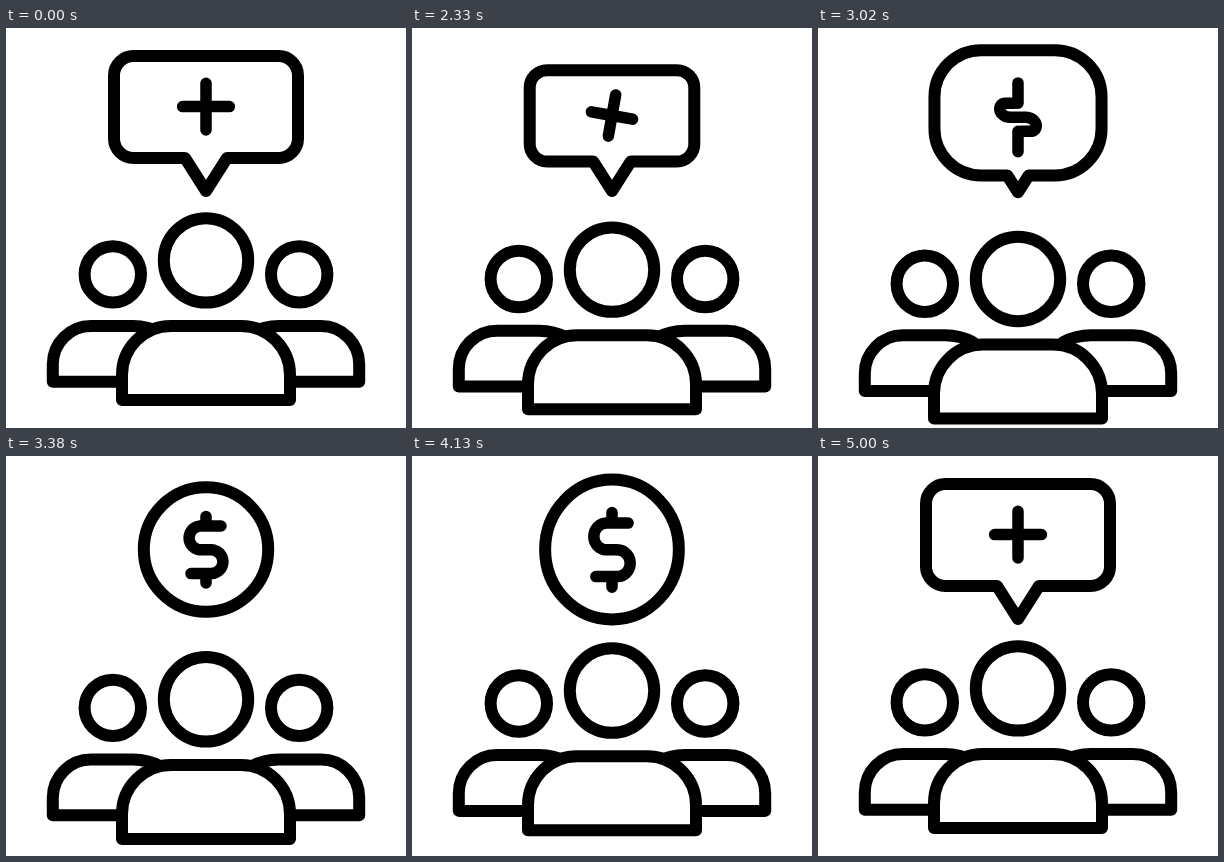
Animation, 400 px wide and 400 px high, one loop 5030 ms. Source, as an HTML page with a canvas:

```html
<!DOCTYPE html>
<html lang="en">
<head>
<meta charset="utf-8">
<title>Team and funding</title>
<style>
html, body { margin: 0; width: 100%; height: 100%; overflow: hidden; background: #fff; }
canvas { display: block; width: 400px; height: 400px; }
</style>
</head>
<body>
<canvas id="stage" width="400" height="400"></canvas>
<script>
const ctx = document.getElementById('stage').getContext('2d');
const LOOP = 5030, START = 2000, STEP = 30;
const TIP_Y = 163, COIN_Y = 93.5;
const FLIP_FROM = 3985, FLIP_TO = 4745;
const LINE = 12;

// Smooth curve through [time, value] keys without overshoot between them.
function track(...keys) {
  const n = keys.length;
  const d = keys.slice(1).map((k, i) => (k[1] - keys[i][1]) / (k[0] - keys[i][0]));
  const slope = keys.map((k, i) => {
    if (i === 0 || i === n - 1 || d[i - 1] * d[i] <= 0) return 0;
    return 2 * d[i - 1] * d[i] / (d[i - 1] + d[i]);
  });
  return t => {
    if (t <= keys[0][0]) return keys[0][1];
    if (t >= keys[n - 1][0]) return keys[n - 1][1];
    let i = 0;
    while (t > keys[i + 1][0]) i++;
    const [t0, a] = keys[i], [t1, b] = keys[i + 1];
    const h = t1 - t0, u = (t - t0) / h, u2 = u * u, u3 = u2 * u;
    return a * (2 * u3 - 3 * u2 + 1) + b * (3 * u2 - 2 * u3) +
      h * (slope[i] * (u3 - 2 * u2 + u) + slope[i + 1] * (u3 - u2));
  };
}

const dropAt = track([2000, 0], [2030, 0.1], [2300, 8], [2540, 19.6], [2640, 20.8],
  [2750, 20.4], [3080, 18], [3380, 10.9], [3620, 6.4], [3800, 4.3], [4160, 2],
  [4400, 0.9], [4730, 0.2], [5000, 0]);
const scaleAt = track([2000, 1], [2030, 0.978], [2250, 0.86], [2570, 1.08],
  [2750, 1.078], [3060, 1.1], [3380, 1], [3770, 1.168], [4160, 1.12], [4365, 1.07]);
const spinAt = track([2000, 0], [2030, 2.5], [2300, 90], [2600, 180]);
const morphAt = track([2500, 0], [2750, 0.13], [3060, 0.6], [3330, 1]);
const stretchAt = track([2450, 0], [2750, 0.4], [3250, 1]);

const mix = (a, b, u) => a + (b - a) * u;

function stroke(width = LINE) {
  ctx.setTransform(1, 0, 0, 1, 0, 0);
  ctx.lineWidth = width;
  ctx.stroke();
}

function ring(x, y, r) {
  ctx.beginPath();
  ctx.arc(x, y, r, 0, Math.PI * 2);
  stroke();
}

function sidePerson(dy, flip) {
  ctx.setTransform(flip ? -1 : 1, 0, 0, 1, flip ? 400 : 0, dy);
  ctx.beginPath();
  ctx.moveTo(116, 353.8);
  ctx.lineTo(46.8, 353.8);
  ctx.lineTo(46.8, 336);
  ctx.arcTo(46.8, 298, 85, 298, 38.2);
  ctx.lineTo(127, 298);
  ctx.quadraticCurveTo(142, 298, 155, 305);
  stroke();
  ring(flip ? 293.2 : 106.8, 246.4 + dy, 28.2);
}

function frontPerson(dy) {
  ctx.setTransform(1, 0, 0, 1, 0, dy);
  ctx.beginPath();
  ctx.moveTo(116, 372);
  ctx.lineTo(116, 347);
  ctx.arcTo(116, 298, 165, 298, 49);
  ctx.lineTo(235, 298);
  ctx.arcTo(284, 298, 284, 347, 49);
  ctx.lineTo(284, 372);
  ctx.closePath();
  ctx.fill();
  stroke();
  ring(200, 232.4 + dy, 42.2);
}

// Speech bubble at m = 0, coin at m = 1.
function badge(m) {
  const w = mix(92, 62.2, m), top = mix(28, 31.3, m), bottom = mix(130, 155.7, m);
  const r = mix(19.5, 62.2, m), base = mix(21, 0, m), tip = mix(TIP_Y, 155.7, m);
  const l = 200 - w, rt = 200 + w;
  ctx.beginPath();
  ctx.moveTo(200, tip);
  ctx.lineTo(200 - base, bottom);
  ctx.lineTo(l + r, bottom);
  ctx.arcTo(l, bottom, l, bottom - r, r);
  ctx.lineTo(l, top + r);
  ctx.arcTo(l, top, l + r, top, r);
  ctx.lineTo(rt - r, top);
  ctx.arcTo(rt, top, rt, top + r, r);
  ctx.lineTo(rt, bottom - r);
  ctx.arcTo(rt, bottom, rt - r, bottom, r);
  ctx.lineTo(200 + base, bottom);
  ctx.closePath();
  stroke();
}

// Point on the S of the dollar sign, centred on 0,0; u runs from 0 to 1.
function sPoint(u) {
  if (u > 0.5) return sPoint(1 - u).map(v => -v);
  const r = 11.9, bend = Math.PI * r;
  const d = u * 2 * (20 + bend + 5);
  if (d < 20) return [15 - d, -2 * r];
  if (d < 20 + bend) {
    const a = (d - 20) / r;
    return [-5 - r * Math.sin(a), -r - r * Math.cos(a)];
  }
  return [d - 25 - bend, 0];
}

// Plus at m = 0, dollar at m = 1; coordinates around its own centre.
function symbol(m, stretch) {
  const half = mix(23.4, 33.2, stretch), gap = 23.8 * m;
  ctx.beginPath();
  for (const side of [-1, 1]) {
    ctx.moveTo(0, side * half);
    ctx.lineTo(0, side * gap);
  }
  // The hooks of the S grow out of the ends of the bar.
  const n = 60;
  for (let i = 0; i <= n; i++) {
    const u = i / n, v = u * 2 - 1, [x, y] = sPoint(u);
    const bar = 23.4 * Math.sign(v) * Math.abs(v) ** 0.4;
    const px = mix(bar, x, m), py = y * m;
    if (i) ctx.lineTo(px, py); else ctx.moveTo(px, py);
  }
  stroke(11.5);
}

function draw(t) {
  ctx.setTransform(1, 0, 0, 1, 0, 0);
  ctx.fillStyle = '#fff';
  ctx.strokeStyle = '#000';
  ctx.lineCap = ctx.lineJoin = 'round';
  ctx.fillRect(0, 0, 400, 400);

  const drop = dropAt(t);
  sidePerson(drop / 2, false);
  sidePerson(drop / 2, true);
  frontPerson(drop);

  const p = Math.min(1, Math.max(0, (t - FLIP_FROM) / (FLIP_TO - FLIP_FROM)));
  const turn = p * p * (3 - 2 * p) * Math.PI;
  const width = Math.abs(Math.cos(turn));
  const back = turn > Math.PI / 2;
  const m = back ? 0 : morphAt(t), stretch = back ? 0 : stretchAt(t);
  const scale = back ? 1 : scaleAt(t);
  const anchor = mix(TIP_Y, COIN_Y, stretch);

  const place = () => {
    ctx.translate(200, anchor);
    ctx.scale(scale * width, scale);
    ctx.translate(-200, -anchor);
  };
  place();
  badge(m);
  place();
  ctx.translate(200, mix(78.6, 93.8, stretch));
  if (!back) ctx.rotate((spinAt(t) % 180) * Math.PI / 180);
  symbol(m, stretch);
}

function tick(now) {
  const t = now % LOOP;
  draw(t < START ? 0 : START + STEP * Math.floor((t - START) / STEP + 1e-6));
  requestAnimationFrame(tick);
}
draw(0);
requestAnimationFrame(tick);
</script>
</body>
</html>
```
